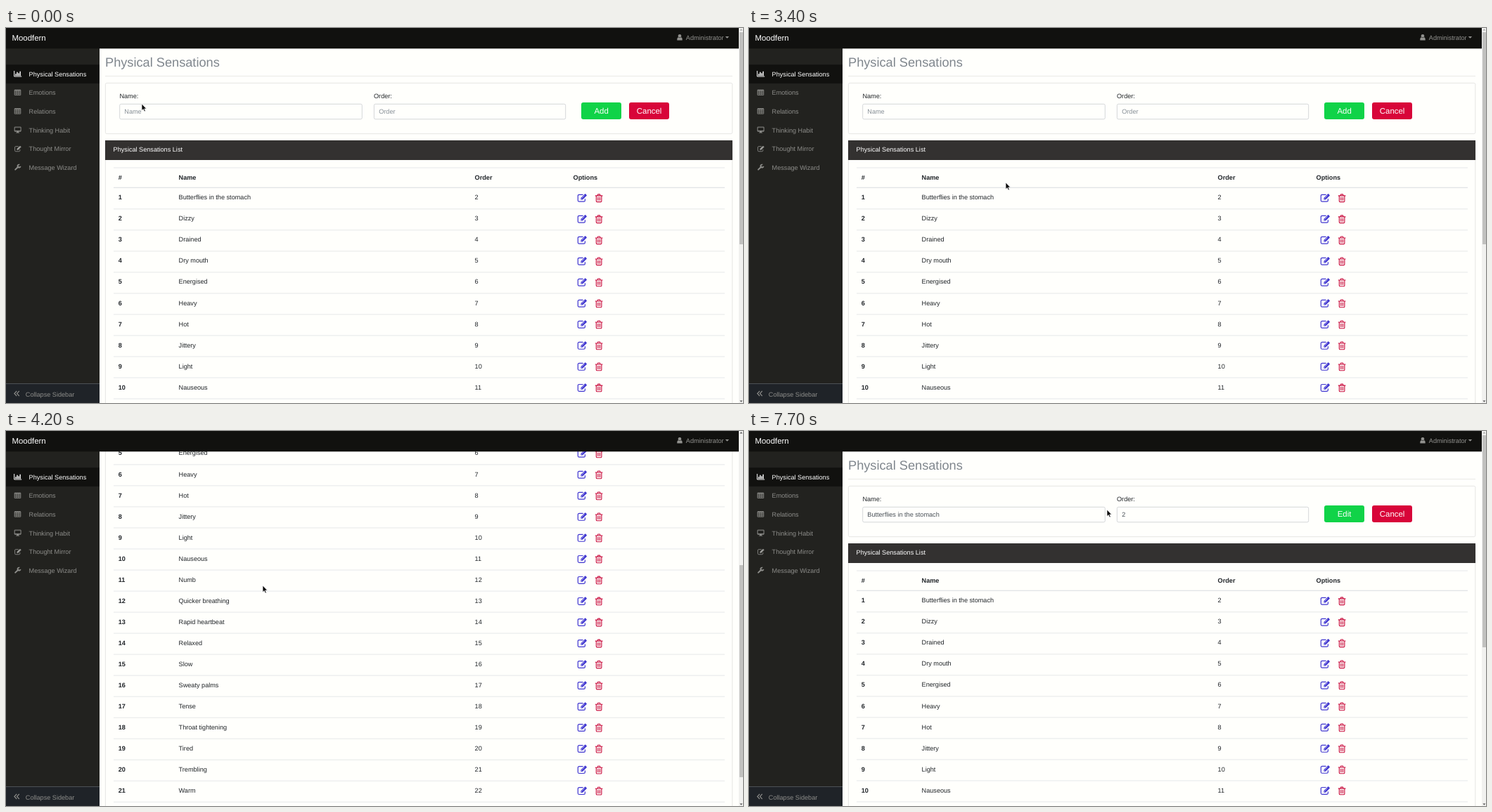
Animation of 1048 by 534 pixels, one loop 8 s. Source, as an HTML page:

```html
<!DOCTYPE html>
<html lang="en">
<head>
<meta charset="utf-8">
<title>Admin list</title>
<style>
  html, body { margin: 0; height: 100%; overflow: hidden; background: #fffffc; }
  svg { display: block; width: 100vw; height: 100vh; }
  text { font: 9.15px "Liberation Sans", Arial, sans-serif; fill: currentColor; text-rendering: geometricPrecision; white-space: pre; }
  .b { font-weight: bold; }
  .lg { font-size: 11.45px; }
  .h1 { font-size: 18.2px; }
  .url { font-size: 8.42px; }
  .line { fill: none; stroke: currentColor; }
  .fill { fill: currentColor; }
  .box { fill: #fffffc; stroke: #dfdfdd; stroke-width: .8; }
  .input { fill: #fffffc; stroke: #c9cdd1; stroke-width: .8; }
  .cursor { fill: #0a0a0a; stroke: #fff; stroke-width: .7; stroke-linejoin: round; }
</style>
</head>
<body>
<svg id="stage" viewBox="0 0 1048 534" preserveAspectRatio="none">
  <defs>
    <g id="edit">
      <path class="line" stroke-width="1.2" d="M11 7.4V9.6Q11 11.3 9.3 11.3H2.6Q.9 11.3 .9 9.6V3.2Q.9 1.5 2.6 1.5H8.2"/>
      <path class="fill" d="M5 6.2 10.8.5Q11.2.1 11.7.5L13.3 2.1Q13.7 2.6 13.3 3L7.5 8.7H5Z"/>
      <path d="M6.4 6.4 10.2 2.6M5.7 6.9 6.8 8" stroke="#fffffc" stroke-width=".6"/>
    </g>
    <g id="trash" class="line">
      <path stroke-width="1.1" d="M0 2.8H10.6M3.2 2.6 3.9.8H6.7L7.4 2.6M1.5 3V10.2Q1.5 11.5 2.6 11.5H8Q9.1 11.5 9.1 10.2V3"/>
      <path stroke-width=".9" d="M3.5 4.7V9.7M5.3 4.7V9.7M7.1 4.7V9.7"/>
    </g>
    <g id="chart">
      <path class="line" d="M.5 0V8H11"/>
      <path class="fill" d="M2 4.2H3.4V7H2ZM4.1 1.8H5.5V7H4.1ZM6.2 3.2H7.6V7H6.2ZM8.3.8H9.7V7H8.3Z"/>
    </g>
    <g id="table">
      <path class="line" stroke-width=".9" d="M1 .6H9.6V7.8H1ZM3.9 1V7.8M6.8 1V7.8M1 3.4H9.6M1 5.6H9.6"/>
      <path class="fill" d="M1 .3H9.6V1.8H1Z"/>
    </g>
    <g id="desktop">
      <path class="line" d="M1 .2H9.9V6H1Z"/>
      <path class="fill" d="M1 5H9.9V6.4H1ZM4.3 6.4H6.6L7 7.8H8V8.6H3V7.8H4Z"/>
    </g>
    <g id="pencil"><use href="#edit" transform="scale(.72)" x="1"/></g>
    <g id="wrench">
      <path class="line" stroke-width="2" stroke-linecap="round" d="M2 7.4 6.3 3.2"/>
      <path class="line" stroke-width="1.7" d="M8.1.4A2.1 2.1 0 1 0 9.4 2.6"/>
    </g>
    <path id="arrow" d="M0 0V9.6L2.2 7.6 3.7 11 5.3 10.3 3.8 7H6.7Z"/>
    <path id="hand" d="M-.9.6Q0-.5.9.6V3.2L4 4Q4.9 4.3 4.8 5.2L4.3 8.9H-.6L-2.9 5.6Q-2.7 4.5-1.6 5L-.9 5.7Z"/>
    <path id="beam" d="M-2.3-5H-.6L0-4.6.6-5H2.3V-4H.5V4H2.3V5H.6L0 4.6-.6 5H-2.3V4H-.5V-4H-2.3Z" stroke-width=".4"/>
  </defs>
</svg>
<script>
const LOOP = 8000, ROW = 30.02, MAX_SCROLL = 392;
const stage = document.getElementById('stage');
const $ = id => document.getElementById(id);

const names = ['Butterflies in the stomach', 'Dizzy', 'Drained', 'Dry mouth', 'Energised', 'Heavy', 'Hot',
  'Jittery', 'Light', 'Nauseous', 'Numb', 'Quicker breathing', 'Rapid heartbeat', 'Relaxed', 'Slow',
  'Sweaty palms', 'Tense', 'Throat tightening', 'Tired', 'Trembling', 'Warm', 'Rona Test'];
const menu = [['chart', 'Physical Sensations'], ['table', 'Emotions'], ['table', 'Relations'],
  ['desktop', 'Thinking Habit'], ['pencil', 'Thought Mirror'], ['wrench', 'Message Wizard']];

const text = (x, y, s, color = '#212529', cls = '', extra = '') =>
  `<text x="${x}" y="${y}" color="${color}" class="${cls}" ${extra}>${s}</text>`;
const rect = (x, y, w, h, attrs) => `<rect x="${x}" y="${y}" width="${w}" height="${h}" ${attrs}/>`;
const icon = (id, x, y, color) => `<use href="#${id}" x="${x}" y="${y}" color="${color}"/>`;
const rule = (y, w = .8) => rect(153, y - w / 2, 869, w, 'fill="#dfe2e4"');

const row = (name, i) => {
  const y = 244.4 + i * ROW;
  return (i ? rule(y - 16.6) : '') + text(159.8, y, i + 1, undefined, 'b') + text(245.6, y, name) +
    text(666.6, y, i + 2) + icon('edit', 812.4, y - 8.6, '#3f35d0') + icon('trash', 837.8, y - 8.3, '#c90f3e');
};

const page = `<g id="page">
  ${text(141, 55, 'Physical Sensations', '#7f868d', 'h1')}
  ${rect(141, 68.2, 892, .8, 'fill="#e4e4e2"')}
  ${rect(141.4, 78.4, 891.4, 72.2, 'rx="2" class="box"')}
  ${text(161.4, 100, 'Name:')}${text(523, 100, 'Order:')}
  ${rect(161.7, 108.3, 344.6, 21.5, 'rx="2" class="input"')}
  ${rect(523.4, 108.3, 272.3, 21.5, 'rx="2" class="input"')}
  ${text(168.3, 122, '', '', '', 'id="name"')}${text(530.2, 122, '', '', '', 'id="order"')}
  ${rect(818, 106, 57, 24, 'rx="3" fill="#10d348"')}
  ${rect(886, 106, 57, 24, 'rx="3" fill="#d80539"')}
  ${text(846.6, 122, '', '#fff', 'lg', 'id="save" text-anchor="middle"')}
  ${text(914.6, 122, 'Cancel', '#fff', 'lg', 'text-anchor="middle"')}
  ${rect(141.4, 160.4, 891.4, 747.8, 'rx="2" class="box"')}
  ${rect(141, 160, 892, 28, 'fill="#333130"')}
  ${text(152.6, 176.4, 'Physical Sensations List', '#fff')}
  ${rule(199)}${rule(227.3, 1.2)}
  ${[[159.8, '#'], [245.6, 'Name'], [666.6, 'Order'], [806.6, 'Options']]
    .map(([x, s]) => text(x, 216, s, undefined, 'b')).join('')}
  ${names.map(row).join('')}
</g>`;

const sidebar = rect(0, 29, 133, 505, 'fill="#22221f"') +
  menu.map(([id, label], i) => {
    const y = 68.6 + i * 26.65;
    return `<g id="item${i}" color="${i ? '#8d8d8a' : '#fff'}">
      ${rect(0, y - 16.4, 133, 26.7, `fill="#11110f" opacity="${i ? 0 : 1}"`)}
      <use href="#${id}" x="11.2" y="${y - 7.6}"/>
      <text x="32.6" y="${y}">${label}</text></g>`;
  }).join('') +
  rect(0, 506, 133, 28, 'fill="#1f2328"') + rect(0, 506, 133, .8, 'fill="#585d61"') +
  `<path class="line" color="#8d8d8a" stroke-width="1.1" d="M15.2 517 11.9 520.5 15.2 524M18.8 517 15.5 520.5 18.8 524"/>` +
  text(27.8, 524.8, 'Collapse Sidebar', '#8d8d8a');

const navbar = rect(0, 0, 1042, 29.3, 'fill="#11110f"') +
  text(8.4, 17.6, 'Moodfern', '#fff', 'lg') +
  `<g class="fill" color="#92928f"><circle cx="958" cy="11.3" r="2.3"/>
   <path d="M954.3 17.6Q954 13.4 956.2 13.2 958 14.6 959.8 13.2 962 13.4 961.7 17.6Z"/>
   <path d="M1022.8 12H1028.2L1025.5 14.8Z"/></g>` +
  text(966.8, 16.6, 'Administrator', '#92928f');

const scrollbar = rect(1042, 0, 6, 534, 'fill="#f1f1ef"') + rect(1043, 6, 5, 302, 'id="thumb" fill="#c1c1bf"') +
  `<path id="up" d="M1043.4 3.4H1047.4L1045.4 1.2Z"/><path id="down" d="M1043.4 530.4H1047.4L1045.4 532.7Z"/>`;

const bubble = `<g id="bubble">${rect(0, 521.5, 157, 12.5, 'fill="#dddfe1"')}
  ${text(2.4, 531.8, 'https://inti-admin.webcentriq.ga/emotions', '#5f6368', 'url')}</g>`;

stage.insertAdjacentHTML('beforeend', page + sidebar + navbar + scrollbar + bubble + '<use id="cursor" class="cursor"/>');

// Waypoints: time, values..., and for the pointer its shape from that time on
const pointer = [
  [0, 193, 108, 'arrow'], [100, 193, 108, 'arrow'], [200, 193.5, 109, 'beam'], [1500, 193.5, 109, 'beam'],
  [1700, 265, 118, 'beam'], [1800, 265, 118, 'beam'], [2000, 128, 110, 'hand'], [2100, 60, 103, 'hand'],
  [2200, 60, 103, 'hand'], [2300, 58, 102, 'hand'], [2700, 58, 102, 'hand'], [2800, 150, 150, 'arrow'],
  [3400, 365, 220, 'arrow'], [4700, 365, 220, 'arrow'], [5000, 720, 190, 'arrow'], [5200, 922, 205, 'arrow'],
  [5500, 835, 240, 'arrow'], [5600, 818, 243, 'hand'], [6600, 818, 243, 'hand'], [6700, 720, 208, 'arrow'],
  [6800, 720, 208, 'arrow'], [7000, 540, 160, 'arrow'], [7100, 440, 129, 'beam'], [7200, 440, 129, 'beam'],
  [7300, 406, 122, 'beam'], [7600, 498, 112, 'beam'], [7700, 509, 112, 'arrow']];
const scroll = [[0, 0], [3400, 0], [3600, 380], [3700, MAX_SCROLL], [4000, MAX_SCROLL],
  [4100, 387], [4200, 330], [4500, 330], [4600, 0]];
const fade = [[0, 0], [2200, 0], [2600, 1], [2700, 1], [3100, 0]];

function at(track, t) {
  const i = track.findLastIndex(k => k[0] <= t), a = track[i], b = track[i + 1] || a;
  const p = b === a ? 0 : (t - a[0]) / (b[0] - a[0]);
  return a.slice(1).map((v, j) => typeof v === 'number' ? v + (b[j + 1] - v) * p : v);
}

function set(id, attrs) {
  for (const k in attrs) $(id).setAttribute(k, attrs[k]);
}

function draw(t) {
  const [x, y, shape] = at(pointer, t), [top] = at(scroll, t), [alpha] = at(fade, t);
  const hover = shape === 'hand' && x < 133, editing = t >= 6200;

  set('cursor', { href: '#' + shape, x, y });
  set('page', { transform: `translate(0 ${-top})` });
  set('thumb', { y: 6 + top * .5605 });
  set('up', { fill: top > 0 ? '#505050' : '#a3a3a3' });
  set('down', { fill: top < MAX_SCROLL ? '#505050' : '#a3a3a3' });
  set('bubble', { opacity: alpha });
  set('item1', { color: hover ? '#fff' : '#8d8d8a' });
  $('item1').firstElementChild.setAttribute('opacity', hover ? 1 : 0);

  const color = editing ? '#495057' : '#868e96';
  set('name', { color });
  set('order', { color });
  $('name').textContent = editing ? names[0] : 'Name';
  $('order').textContent = editing ? '2' : 'Order';
  $('save').textContent = editing ? 'Edit' : 'Add';
}

function tick() {
  draw(Math.floor(performance.now() % LOOP / 100) * 100);
  requestAnimationFrame(tick);
}
tick();
</script>
</body>
</html>
```
